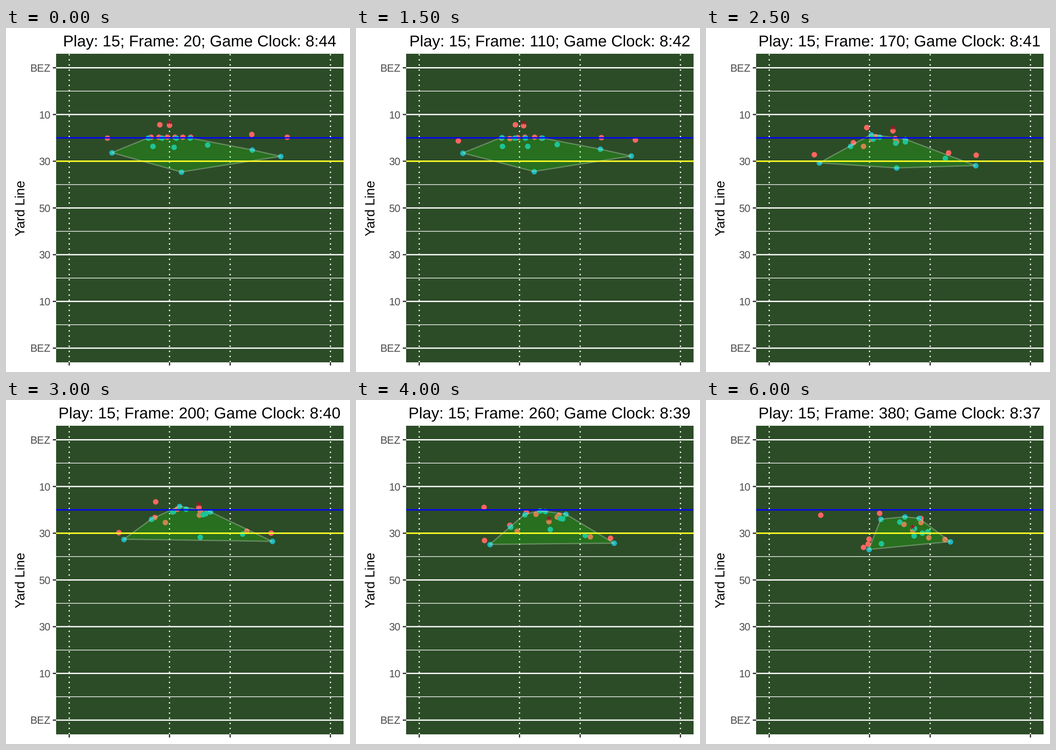
A matplotlib script for the animation above (6.5 s loop, 748x748 px).

```python
import matplotlib.pyplot as plt
import numpy as np
from matplotlib.animation import FuncAnimation
from matplotlib.patches import Polygon, Rectangle

SIZE = 748
PX = 0.72  # points per pixel at 100 dpi
LEFT, RIGHT, TOP, BOTTOM = 109, 734, 56, 726.7
STEPS = 13
SNAP, END = 1, 6  # seconds: the play starts and ends


def route(*points, times=(SNAP, 3, END)):
    """Smooth run through a few points, at rest before the snap and at the end."""
    p, t = np.array(points, float), np.array(times, float)
    slope = np.gradient(p, t, axis=0)
    slope[0] = slope[-1] = 0

    def at(now):
        now = np.clip(now, SNAP, END)
        i = min(np.searchsorted(t, now, side="right"), len(t) - 1) - 1
        h = t[i + 1] - t[i]
        u = (now - t[i]) / h
        ease = u * u * (3 - 2 * u)
        bend = h * u * (1 - u) * ((1 - u) * slope[i] - u * slope[i + 1])
        return p[i] + (p[i + 1] - p[i]) * ease + bend

    return at


def marking(runner, first, last):
    """Man coverage: follow a runner while the cushion closes."""
    first, last = np.array(first), np.array(last)

    def at(now):
        left = 1 - np.clip((now - SNAP) / (END - SNAP), 0, 1)
        return runner(now) + last + (first - last) * left ** 2

    return at


def row(x, y, gap, moves):
    """Players lined up side by side, each with a halfway and a final spot."""
    return [route((x + gap * i, y), *move) for i, move in enumerate(moves)]


# Offense
wide_left = route((220, 239), (245, 288), (342, 320))
wide_right = route((611, 237), (576, 289), (519, 303))
slot = route((534, 231), (523, 285), (484, 299))
runner = route((334, 210), (358, 212), (278, 233), (249, 250),
               times=(SNAP, 2, 4, END))
carrier = route((355, 211), (419, 233), (419, 264), (449, 283),
                times=(SNAP, 3, 4, END))
linemen = row(315, 237, 17.3, [
    [(323, 255), (354, 302)], [(346, 266), (352, 313)],
    [(364, 242), (377, 246)], [(372, 237), (430, 270)],
    [(422, 242), (467, 266)], [(420, 250), (467, 257)]])
offense = [wide_left, wide_right, slot, runner, carrier, *linemen]

# Defense
rushers = row(309, 239, 30.3, [
    [(377, 231), (421, 265)], [(391, 237), (432, 254)],
    [(362, 243), (380, 259)], [(444, 243), (463, 257)]])
defense = [
    *rushers,
    route((319, 257), (316, 259), (381, 312)),
    route((365, 259), (428, 249), (453, 279)),
    route((438, 254), (434, 247), (482, 286)),
    route((381, 313), (422, 298), (422, 281), (452, 295),
          times=(SNAP, 3, 4, END)),
    marking(wide_left, (10, 32), (12, 5)),
    marking(wide_right, (-14, 42), (12, 5)),
    marking(slot, (1, 34), (-14, -10)),
]


def half_hull(points):
    chain = []
    for p in points:
        while len(chain) > 1:
            (x1, y1), (x2, y2) = chain[-2:]
            if (x2 - x1) * (p[1] - y1) - (y2 - y1) * (p[0] - x1) > 0:
                break
            chain.pop()
        chain.append(p)
    return chain[:-1]


def hull(points):
    pts = sorted(map(tuple, points))
    return half_hull(pts) + half_hull(pts[::-1])


plt.rcParams["font.family"] = ["Liberation Sans", "DejaVu Sans"]
plt.rcParams["text.hinting"] = "none"
fig = plt.figure(figsize=(SIZE / 100, SIZE / 100), dpi=100, facecolor="white")
ax = fig.add_axes([0, 0, 1, 1])
ax.set_xlim(0, SIZE)
ax.set_ylim(SIZE, 0)
ax.axis("off")


def line(xs, ys, color, width, z=1, **kw):
    ax.plot(xs, ys, color=color, lw=width * PX, zorder=z, snap=False,
            solid_capstyle="butt", dash_capstyle="butt", **kw)


def label(x, y, text, px, color="black", **kw):
    return ax.text(x, y, text, fontsize=px * PX, color=color, va="baseline", **kw)


def dots(color, z):
    return ax.plot([], [], "o", ms=12 * PX, mew=0, color=color,
                   zorder=z, snap=False)[0]


def yard(n):
    return 86.5 + 5.08 * (n + 10)


# Field, yard lines and axes
ax.add_patch(Rectangle((LEFT, TOP), RIGHT - LEFT, BOTTOM - TOP,
                       fc="#2c4c27", ec="none", zorder=0))
for n in range(-10, 111, 10):
    y = yard(n)
    if n % 20 == 0:
        line([LEFT, RIGHT], [y, y], "white", 1.4)
        continue
    line([LEFT, RIGHT], [y, y], "white", 2.8)
    line([LEFT - 7.2, LEFT], [y, y], "#333333", 2.8)
    name = "BEZ" if n in (-10, 110) else str(min(n, 100 - n))
    label(96.5, y + 8.2, name, 22.9, "#4d4d4d", ha="right")

middle = (LEFT + RIGHT) / 2
for offset in (-284, -65.9, 65.9, 284):
    x = middle + offset
    line([x, x], [BOTTOM, TOP], "white", 2.78, 2, linestyle=(0, (1, 3)))
    line([x, x], [BOTTOM, BOTTOM + 7.2], "#333333", 2.8)
label(40.5, 391.5, "Yard Line", 28.7, rotation=90, ha="center",
      rotation_mode="anchor")

# Scrimmage and first-down lines
line([LEFT, RIGHT], [yard(20)] * 2, "blue", 2.9, 6)
line([LEFT, RIGHT], [yard(30)] * 2, "#ffff14", 2.9, 6)

title = label(421, 40, "", 34.35, ha="center")
red = dots("#fb6660", 3)
teal = dots("#1eb6bc", 4)
area = Polygon([(0, 0)] * 3, closed=True, fc=(0.1, 1, 0, 0.2),
               ec=(1, 1, 1, 0.27), lw=2.8 * PX, joinstyle="round", zorder=5)
ax.add_patch(area)
ball = ax.plot([], [], marker=(5, 2, 0), ms=10.5 * PX, mew=1.6 * PX,
               color="#9a1220", zorder=7, snap=False)[0]


def update(step):
    now = step / 2
    clock = int(44.12 - 0.55 * step)
    title.set_text(f"Play: 15; Frame: {20 + 30 * step}; Game Clock: 8:{clock}")
    rivals = np.array([at(now) for at in defense])
    red.set_data(*np.array([at(now) for at in offense]).T)
    teal.set_data(*rivals.T)
    area.set_xy(hull(rivals))
    x, y = carrier(now)
    ball.set_data([x], [y - 7])
    return title, red, teal, area, ball


anim = FuncAnimation(fig, update, frames=STEPS, interval=500,
                     repeat=True, repeat_delay=0)
plt.show()
```
